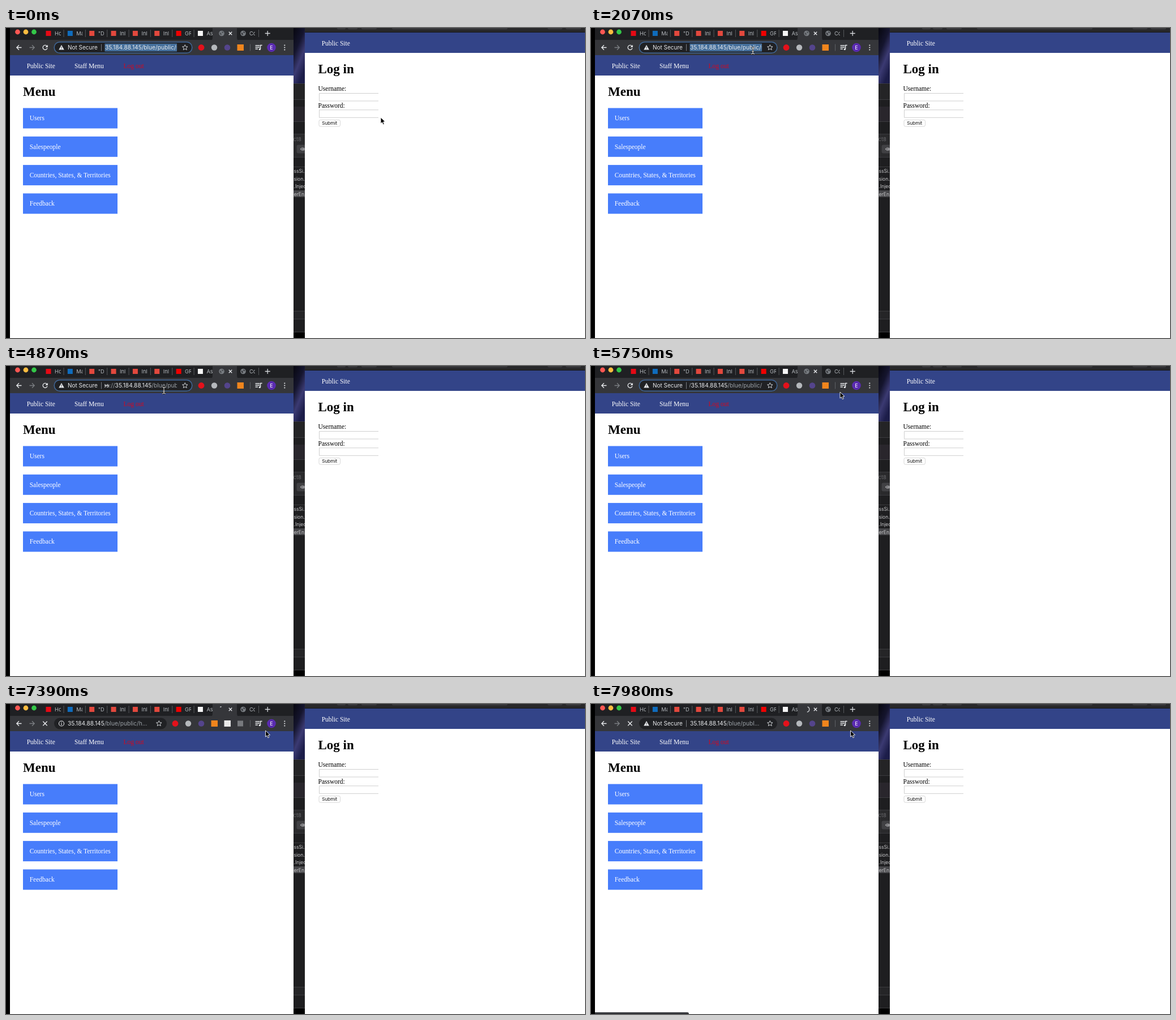
These frames come from a looping animation (1023x548 px, 8000 ms). An HTML page:

```html
<!DOCTYPE html>
<html lang="en">
<head>
<meta charset="utf-8">
<title>Session demo</title>
<style>
html, body { margin: 0; width: 100%; height: 100%; overflow: hidden; background: #000; }
svg { display: block; width: 1023px; height: 548px; }
text { white-space: pre; font-family: Inter, Roboto, sans-serif; }
.page { font-family: "Liberation Serif", "Noto Serif", serif; }
</style>
</head>
<body>
<svg id="stage" viewBox="0 0 1023 548" xmlns="http://www.w3.org/2000/svg"></svg>
<script>
const LOOP = 8000;
const HOST = "35.184.88.145";
const DIM = "#9aa0a6", LIGHT = "#e8eaed", BAR = "#35363a", DARK = "#202124";

const rect = (x, y, w, h, fill, more = "") =>
  `<rect x="${x}" y="${y}" width="${w}" height="${h}" fill="${fill}" ${more}/>`;
const dot = (x, y, r, fill, more = "") =>
  `<circle cx="${x}" cy="${y}" r="${r}" fill="${fill}" ${more}/>`;
const line = (d, color, w = 1, more = "") =>
  `<path d="${d}" fill="none" stroke="${color}" stroke-width="${w}" ${more}/>`;
const text = (x, y, s, size, fill, more = "") =>
  `<text x="${x}" y="${y}" font-size="${size}" fill="${fill}" ${more}>${s}</text>`;
const page = (x, y, s, fill, size = 11.5, more = "") =>
  text(x, y, s, size, fill, `class="page" ${more}`);
const group = (id, body, more = "") => `<g id="${id}" ${more}>${body}</g>`;
const span = (s, fill, more = "") => `<tspan fill="${fill}" ${more}>${s}</tspan>`;

const globe = (x, y, fill, ink) => dot(x, y, 4.8, fill) +
  `<path d="M${x - 3.4} ${y - 1.6}q2.4 .2 3 1.8t-.6 3.4q-2.6-2-2.4-5.2zM${x + .4} ${y - 3.6}q2.4 .2 3 2.4-1.6 1.2-2.6 .2t-.4-2.6z" fill="${ink}"/>`;
const star = (x, y) => {
  let d = "";
  for (let i = 0; i < 10; i++) {
    const a = i * Math.PI / 5 - Math.PI / 2, r = i % 2 ? 2.3 : 5;
    d += (i ? "L" : "M") + (x + r * Math.cos(a)).toFixed(2) + " " + (y + r * Math.sin(a)).toFixed(2);
  }
  return line(d + "z", "#d0d3d7", 1, 'stroke-linejoin="round"');
};
const cross = (x, y, r, color, w) =>
  line(`M${x - r} ${y - r}l${2 * r} ${2 * r}m0 ${-2 * r}l${-2 * r} ${2 * r}`, color, w);

function tabs() {
  const icons = [
    ["#e50914", "Ho"], ["#0f6cbd", "Ma"], ["#e2483d", "\"D"], ["#e2483d", "Inl"],
    ["#e2483d", "Inl"], ["#e2483d", "Inl"], ["#f00000", "GR"], ["#f5f5f5", "As"]
  ];
  let s = rect(7, 0, 501, 22, "#1f2023");
  ["#fc5753", "#fdbc40", "#33c748"].forEach((c, i) => s += dot(20.5 + i * 14.5, 7, 4.4, c));
  icons.forEach(([c, label], i) => {
    const x = 75 + i * 38.35;
    s += rect(x - 4.5, 5, 9, 9, c) +
      `<svg x="${x + 11}" y="0" width="11" height="20">${text(0, 12.6, label, 9.3, "#b4b8bd")}</svg>`;
    if (i < 7) s += line(`M${x + 27} 3V16`, "#54575b");
  });
  s += `<path d="M361 22Q365 22 365 17V0H408V17Q408 22 412 22z" fill="${BAR}"/>`;
  s += cross(396.5, 9.5, 2.7, LIGHT, 1.3);
  s += globe(419, 9.5, "#777b80", "#35373b") +
    `<svg x="430" y="0" width="10" height="20">${text(0, 12.6, "Co", 9.3, "#b4b8bd")}</svg>`;
  s += line("M446.5 3V16", "#54575b") + line("M457.7 9.5h9M462.2 5v9", "#d5d8db", 1.3);
  return s;
}

function toolbar() {
  const warn = `<path d="M98 30l4.8 8.4h-9.6z" fill="${LIGHT}"/>` + line("M98 32.8v2.7m0 .9v1", BAR, 1);
  let s = rect(7, 21, 501, 27, BAR);
  s += line("M27.5 34.5H19M23 30.3l-4.2 4.2 4.2 4.2", LIGHT, 1.3);
  s += line("M41.500 34.500H50M46 30.3l4.2 4.2-4.2 4.200", "#7b7e82", 1.3);
  s += group("reload", line("M72.300 32A4 4 0 1 0 73 35.500", LIGHT, 1.3) +
    `<path d="M73.800 29.800v4.300h-4.300z" fill="${LIGHT}"/>`);
  s += group("stop", cross(69, 34.5, 3.7, LIGHT, 1.4));

  s += group("wide",
    rect(85, 24.5, 244, 20, DARK, 'rx="10"') +
    group("ring", rect(85.2, 24.7, 243.6, 19.6, "none", 'rx="9.8" stroke="#41699b" stroke-width="1.5"')) +
    warn + text(109, 38, "Not Secure", 10, LIGHT) +
    line("M168.5 28.5V40.5", "#777b80") +
    group("select", rect(174.500, 27.5, 127.5, 14, "#456f9b")) +
    `<g clip-path="url(#field)">${text(175, 38, "", 10.2, LIGHT, 'id="url"')}</g>` +
    group("caret", rect(282, 28, 1, 13, "#fff")) +
    star(316.3, 34.6));

  s += group("narrow",
    rect(85, 24.5, 199, 20, DARK, 'rx="10"') +
    dot(98, 34.5, 4.5, "none", `stroke="${LIGHT}" stroke-width="1.1"`) +
    line("M98 31.800v1.2m0 1v3.200", LIGHT, 1.2) +
    text(109, 38, span(HOST, LIGHT) + span("/blue/public/h...", DIM), 10.2, LIGHT) +
    star(270.300, 34.6));

  s += group("ext",
    dot(345, 34.500, 5.4, "#e4111b") + dot(368, 34.500, 5.2, "#b5b8bc") +
    dot(391, 34.500, 5.3, "#54448c") + rect(408.5, 29, 11.500, 11, "#f0851d") +
    group("extra", rect(431.5, 29, 11.500, 11, "#e9e9e9") + rect(455, 29.500, 10, 10, "#77797d")));

  s += line("M431.5 28.500V40.500", "#5d6064");
  s += line("M440.500 31h8M440.500 34h8M440.500 37h4.500", LIGHT, 1.3) +
    dot(448.3, 37.600, 1.7, LIGHT) + line("M449.600 37.600V30.500h3", LIGHT, 1.3);
  s += dot(469, 34.5, 7.8, "#5a2bb0") + text(469, 37.800, "E", 9, "#fff", 'text-anchor="middle"');
  [30.5, 34.5, 38.5].forEach(y => s += dot(492.3, y, 1.1, LIGHT));
  return s;
}

function leftPage() {
  let s = rect(7, 84, 501, 464, "#fff") + rect(7, 48, 501, 36, "#334488");
  s += page(36.7, 70.5, "Public Site", "#fff") + page(121, 70.5, "Staff Menu", "#fff") +
    page(207.500, 70.5, "Log out", "#cf0a22");
  s += page(30, 120, "Menu", "#000", 23, 'font-weight="bold"');
  ["Users", "Salespeople", "Countries, States, &amp; Territories", "Feedback"].forEach((label, i) => {
    const y = 141.5 + i * 50.3;
    s += rect(30, y, 167, 36, "#477dfb") + page(41.700, y + 21.8, label, "#fff");
  });
  return s;
}

function rightPage() {
  const field = y => line(`M658 ${y}H553.500V${y + 13.5}H658`, "#cfcfcf");
  let s = rect(528, 0, 495, 8, "#28282a");
  [[585, 15], [604, 17], [628, 27], [682, 204], [957, 26], [989, 27]].forEach(
    ([x, w]) => s += rect(x, -6, w, 8.5, "#3a3a3d", 'rx="2"'));
  s += line("M528 7.500H1023", "#161618");
  s += rect(528, 8, 495, 36, "#334488") + rect(528, 44, 495, 504, "#fff");
  s += page(557.700, 30.5, "Public Site", "#fff");
  s += page(551.500, 80, "Log in", "#000", 23, 'font-weight="bold"');
  s += page(551.500, 111, "Username:", "#000") + field(115.5);
  s += page(551.500, 141, "Password:", "#000") + field(144.800);
  s += rect(553, 162.500, 37.500, 11.5, "#fff", 'rx="2.5" stroke="#cdcdcd" stroke-width=".8"');
  return s + text(571.7, 171.200, "Submit", 8.2, "#111", 'text-anchor="middle"');
}

function gap() {
  let s = rect(508, 0, 20, 98, "url(#sky)") + rect(508, 98, 20, 440, "#1e1e20");
  s += rect(508, 100, 20, 26, "#242426") + rect(508, 139, 20, 26, "#29262c");
  s += rect(508, 188, 20, 40, "#2a2a2c");
  [98.5, 126.5, 165.5, 187.5, 228.5, 245.5, 500.5, 514.5, 537.5].forEach(
    y => s += line(`M508 ${y}H528`, "#3b3b3e"));
  s += rect(508, 501, 20, 13, "#252527");
  s += rect(513.5, 206.500, 20, 15, "#414144", 'rx="3"') +
    line("M520.500 214q4-4.500 8 0q-4 4.500-8 0z", "#a5a5a8", 1.2) + dot(525, 214, 1.6, "#a5a5a8");
  s += text(507.500, 200, "ct8", 9.5, "#68686b");
  s += rect(508, 287, 20, 12, "#464649");
  ["ssSi...", "sion...", ".Injec", "erEn..."].forEach(
    (label, i) => s += text(508.500, 256 + i * 13.500, label, 8.5, "#c9c9cb"));
  return `<g clip-path="url(#gap)">${s}</g>`;
}

function popup() {
  return `<g filter="url(#shadow)">${rect(80.5, 22, 207.5, 77, DARK, 'rx="6"')}</g>` +
    rect(80.5, 47.5, 207.500, 26, "#3d3e42") +
    globe(98, 34.500, LIGHT, DARK) + globe(98, 60.5, "#9da1a6", "#3d3e42") +
    dot(97, 85.200, 3, "none", `stroke="${DIM}" stroke-width="1.2"`) + line("M99.300 87.500l3.200 3.200", DIM, 1.3) +
    text(117, 38, "acktools/change_session_id.php", 10.2, DIM) +
    group("caret2", rect(270.5, 28, 1, 12, "#fff")) +
    text(117, 64, span("Change PHP", "#fff", 'font-weight="700"') + "SESSIONID", 10, LIGHT) +
    text(117, 90, `https://${HOST}/blue/publi...`, 10, "#fff", 'font-weight="500"');
}

const stage = document.getElementById("stage");
stage.innerHTML = `<defs>
  <clipPath id="field"><rect x="174" y="26" width="128" height="18"/></clipPath>
  <clipPath id="gap"><rect x="508" y="0" width="20" height="548"/></clipPath>
  <linearGradient id="sky" x1="0" y1="0" x2=".5" y2="1">
    <stop offset="0" stop-color="#07070f"/><stop offset=".4" stop-color="#15152e"/>
    <stop offset=".7" stop-color="#3b3a72"/><stop offset="1" stop-color="#1c1d49"/>
  </linearGradient>
  <filter id="shadow" x="-10%" y="-20%" width="120%" height="150%">
    <feDropShadow dx="0" dy="3" stdDeviation="3" flood-opacity=".45"/>
  </filter></defs>` +
  rect(0, 0, 1023, 548, "#000") + gap() + leftPage() + rightPage() + tabs() + toolbar() +
  group("tabGlobe", globe(381, 9.5, "#777b80", "#4b4d51")) +
  line("", "#c6c9cd", 1.4, 'id="spinner"') +
  group("popup", popup()) +
  group("status", `<path d="M7 545H170q3 0 3 3H7z" fill="#35363a"/>`) +
  group("arrow", `<path d="M0 0V11L2.600 8.700 4.300 12.700 6.300 11.900 4.600 8 8 7.700z" fill="#000" stroke="#fff" stroke-width=".9"/>`) +
  group("beam",
    line("M-3-6Q0-6 0-4Q0-6 3-6M0-5V5M-3 6Q0 6 0 4Q0 6 3 6M-1.500 1.500H1.500", "#111", 2.2) +
    line("M-3-6Q0-6 0-4Q0-6 3-6M0-5V5M-3 6Q0 6 0 4Q0 6 3 6M-1.500 1.500H1.500", "#eee", 1));

const el = {};
stage.querySelectorAll("[id]").forEach(n => el[n.id] = n);
const show = (id, on) => el[id].style.display = on ? "" : "none";

// time, x, y; the pointer jumps from place to place
const path = [
  [0, 662, 158], [150, 560, 140], [300, 395, 168], [450, 291.500, 195],
  [900, 270, 165], [1050, 238, 122], [1190, 225, 101], [1340, 232, 84],
  [1490, 252, 58], [1630, 272, 36], [1780, 282, 31], [1920, 287, 35],
  [2070, 286, 40], [2210, 284, 41], [2360, 283, 38], [2500, 282, 36],
  [3100, 286, 36], [3240, 293, 35], [3390, 297, 35],
  [4720, 288, 39], [4870, 279, 43], [5020, 282, 49], [5170, 291, 50],
  [5460, 330, 45], [5610, 392, 44], [5750, 440, 46], [5900, 458.500, 47]
];
// time, shift of the address text
const shifts = [[0, 0], [3830, 6], [4280, 12], [4420, 17], [5460, 24], [5610, 29], [5750, 33], [5900, 36]];
// time, start and end angle of the loading arc
const arcs = [[7390, -125, -95], [7540, -110, -70], [7690, -100, -20], [7840, -90, 30], [7980, -70, 80]];
const at = (list, t) => list.filter(k => k[0] <= t).pop();

function arc([, from, to]) {
  const p = a => {
    const r = a * Math.PI / 180;
    return `${381 + 4.8 * Math.cos(r)} ${9.5 + 4.8 * Math.sin(r)}`;
  };
  return `M${p(from)}A4.8 4.8 0 0 1 ${p(to)}`;
}

function address(t) {
  if (t < 2210) return HOST + "/blue/public/staff/";
  if (t >= 7980) return span(HOST, LIGHT) + span("/blue/publ...", DIM);
  const tail = t < 5460 ? "/blue/public/staff/" : "/blue/public/";
  return span("https", LIGHT, 'text-decoration="line-through"') +
    span("://", DIM) + span(HOST, LIGHT) + span(tail, DIM);
}

let shown = "";
function render(t) {
  const pop = t >= 6350 && t < 7390, loading = t >= 7390, done = t >= 7980;
  const narrow = t >= 6350 && !done;
  show("popup", pop);
  show("wide", !narrow);
  show("narrow", loading && !done);
  show("ring", !done);
  show("select", t < 2210);
  show("caret", t >= 2500 && t < 2800);
  show("caret2", t < 6790);
  show("extra", narrow);
  show("reload", !loading);
  show("stop", loading);
  show("tabGlobe", !loading);
  show("spinner", loading);
  show("status", done);
  el.ext.setAttribute("transform", `translate(${narrow ? -46 : 0} 0)`);
  if (loading) el.spinner.setAttribute("d", arc(at(arcs, t)));

  const url = address(t);
  if (url !== shown) el.url.innerHTML = shown = url;
  el.url.setAttribute("x", 175 - (done ? 0 : at(shifts, t)[1]));

  const [, x, y] = at(path, t);
  const beam = t >= 1630 && t < 5460;
  show("beam", beam);
  show("arrow", !beam);
  el[beam ? "beam" : "arrow"].setAttribute("transform", `translate(${x} ${y})`);
}

function tick() {
  render(performance.now() % LOOP);
  requestAnimationFrame(tick);
}
tick();
</script>
</body>
</html>
```
